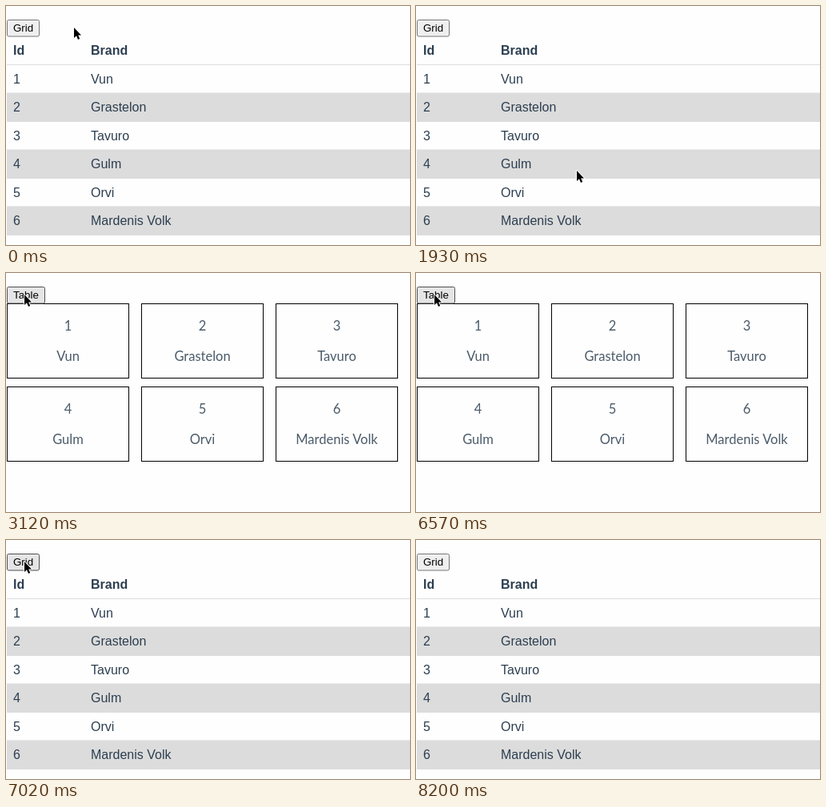
An HTML page that plays this animation: 505 px wide and 299 px high, repeating every 8800 ms.

```html
<!DOCTYPE html>
<html lang="en">
<head>
<meta charset="utf-8">
<title>Table and grid switch</title>
<style>
  html, body { margin: 0; width: 100%; height: 100%; overflow: hidden; background: #fefefe; }
  svg { display: block; width: 505px; height: 299px; }
  text { font-family: "Liberation Sans", Arial, sans-serif; font-size: 16px; fill: #2c3e50; }
  .head { font-weight: bold; }
  #cards text { font-family: Lato, "Open Sans", sans-serif; font-size: 16.5px; text-anchor: middle; fill-opacity: .85; }
  #cards rect { fill: none; stroke: #000; }
  #label { font-size: 13.333px; fill: #000; }
</style>
</head>
<body>
<svg viewBox="0 0 505 299">
  <g id="table"></g>
  <g id="cards"></g>
  <rect id="button" x="1.5" y="17.5" height="20.5" rx="2"/>
  <text id="label" x="9" y="32"></text>
  <path id="cursor" d="M0 0V13L3 10.3L5 15L7.2 14L5.2 9.4H9Z"
    stroke="#fff" stroke-width="1.8" stroke-linejoin="round" paint-order="stroke"/>
</svg>
<script>
const LOOP = 8800;
const STEP = 146;
const brands = ["Vun", "Grastelon", "Tavuro", "Gulm", "Orvi", "Mardenis Volk"];
const byId = id => document.getElementById(id);

function setAttrs(node, attrs) {
  for (const name in attrs) node.setAttribute(name, attrs[name]);
}

function add(parent, tag, attrs, text = "") {
  const node = document.createElementNS("http://www.w3.org/2000/svg", tag);
  setAttrs(node, attrs);
  node.textContent = text;
  parent.append(node);
}

function addRow(table, y, id, brand, style = "") {
  add(table, "text", { x: 9, y, class: style }, id);
  add(table, "text", { x: 106, y, class: style }, brand);
}

function buildTable(table) {
  const rowHeight = 35.5;
  addRow(table, 61, "Id", "Brand", "head");
  add(table, "rect", { x: 1, y: 73, width: 504, height: 1, fill: "#ddd" });
  brands.forEach((brand, i) => {
    const y = 73 + rowHeight * i;
    if (i % 2) add(table, "rect", { x: 1, y, width: 504, height: rowHeight + 1, fill: "#dcdcdc" });
    addRow(table, Math.round(y + 23.6), i + 1, brand);
  });
}

function buildCards(cards) {
  brands.forEach((brand, i) => {
    const x = 1.5 + 168 * (i % 3);
    const y = 38.5 + 104 * Math.floor(i / 3);
    add(cards, "rect", { x, y, width: 152, height: 93 });
    add(cards, "text", { x: x + 76, y: y + 33.5 }, i + 1);
    add(cards, "text", { x: x + 76, y: y + 71.5 }, brand);
  });
}

const home = { x: 85, y: 27 };
const strokes = [
  { start: 600, steps: 4, x: 145, y: 174 },
  { start: 1190, steps: 4, x: 39, y: 245 },
  { start: 1780, steps: 2, x: 201, y: 206 },
  { start: 2080, steps: 4, x: 23, y: 27 },
  { start: 7320, steps: 6, x: 438, y: 267 }
];

const ease = p => (1 - Math.cos(Math.PI * p)) / 2;
const mix = (a, b, p) => a + (b - a) * p;

// The pointer advances in held steps, eased along each stroke.
function pointerAt(t) {
  return strokes.filter(s => t >= s.start).reduce((from, s) => {
    const step = Math.min(s.steps, 1 + Math.floor((t - s.start) / STEP));
    const p = ease(step / s.steps);
    return { x: mix(from.x, s.x, p), y: mix(from.y, s.y, p) };
  }, home);
}

const buttonLook = {
  idle: { fill: "#efefef", stroke: "#767676" },
  hover: { fill: "#e5e5e5", stroke: "#4f4f4f" },
  pressed: { fill: "#f5f5f5", stroke: "#8d8d8d" }
};

const within = (t, start, end) => t >= start && t < end;

function buttonState(t) {
  if (within(t, 2820, 3120) || within(t, 6720, 7020)) return "pressed";
  return within(t, 2520, 7320) ? "hover" : "idle";
}

function render(t) {
  const grid = within(t, 3120, 7020);
  byId("table").style.display = grid ? "none" : "";
  byId("cards").style.display = grid ? "" : "none";
  byId("label").textContent = grid ? "Table" : "Grid";
  setAttrs(byId("button"), { width: grid ? 47 : 40, ...buttonLook[buttonState(t)] });
  const { x, y } = pointerAt(t);
  setAttrs(byId("cursor"), { transform: `translate(${x} ${y})` });
  byId("cursor").style.display = t < 8200 ? "" : "none";
}

buildTable(byId("table"));
buildCards(byId("cards"));

const begin = performance.now();
function frame() {
  render((performance.now() - begin) % LOOP);
  requestAnimationFrame(frame);
}
frame();
</script>
</body>
</html>
```
